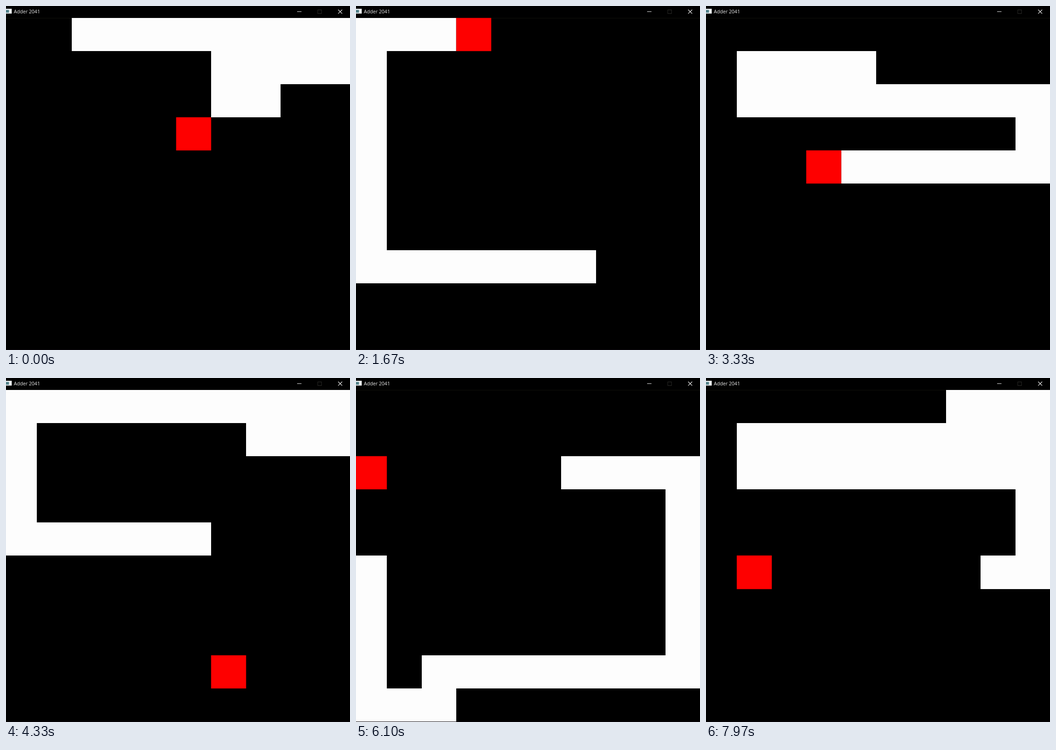
An HTML page that plays this animation: 748x748 px, repeating every 8 s.

```html
<!DOCTYPE html>
<html lang="en">
<head>
<meta charset="utf-8">
<title>Adder 2041</title>
<style>
  html, body { margin: 0; width: 100%; height: 100%; overflow: hidden; background: #000; }
  svg { display: block; width: 100vw; height: 100vh; }
  text { font: 10.6px "Open Sans", "Noto Sans", sans-serif; fill: #ececec; }
</style>
</head>
<body>
<svg viewBox="0 0 748 748">
  <rect width="748" height="748" fill="#000"/>
  <rect y="26" width="748" height="1" fill="#10100a"/>
  <rect y="747" width="748" height="1" fill="#0e0a10"/>

  <rect y="6" width="12.5" height="10.5" fill="#eef2f4"/>
  <rect y="8.5" width="6.5" height="6" fill="#4f8088"/>
  <text x="17" y="16">Adder 2041</text>
  <g fill="none" stroke="#f4f4f4">
    <path d="M633 12.2H642.5"/>
    <rect x="678" y="8.5" width="8" height="8" stroke="#2c2c28"/>
    <path d="M722.3 8L731 16.7M731 8L722.3 16.7" stroke-width="1.1"/>
  </g>

  <path id="snake" fill="#fdfdfd"/>
  <path id="food" fill="#fe0000" stroke="#a00000" stroke-width=".6"/>
</svg>
<script>
const LOOP = 8000, FRAME = 100 / 3, STEP = 51.1, PHASE = 35;
const START_HEAD = 13, START_LENGTH = 14;

// Corners of the route, each pair is column and row.
const corners = ("20 90 91 61 62 92 93 53 54 94 97 07 00 90 91 11 12 92 94 04 00 " +
  "90 91 11 12 92 98 28 29 09 00 90 91 11 12 92 95 15")
  .split(" ").map(c => [+c[0], +c[1]]);

// Positions along the route where food lies, in the order it is eaten.
const meals = [20, 37, 47, 50, 53, 71, 79, 82, 122, 126, 136, 176];

const route = [corners[0]];
for (const [cx, cy] of corners.slice(1)) {
  let [x, y] = route[route.length - 1];
  while (x !== cx || y !== cy) {
    x += Math.sign(cx - x);
    y += Math.sign(cy - y);
    route.push([x, y]);
  }
}

const edgeX = col => Math.round(-9 + 75.8 * col);
const edgeY = row => Math.round(25.7 + 72.15 * row);
const cell = ([x, y]) =>
  `M${edgeX(x)} ${edgeY(y)}H${edgeX(x + 1)}V${edgeY(y + 1)}H${edgeX(x)}Z`;

const snake = document.getElementById("snake");
const food = document.getElementById("food");

function draw(time) {
  const tick = Math.floor((time + 3.4) / FRAME) * FRAME;
  const head = START_HEAD + Math.floor((tick + PHASE) / STEP);
  const eaten = meals.filter(m => m <= head).length;
  const tail = head - START_LENGTH - eaten + 1;
  snake.setAttribute("d", route.slice(tail, head + 1).map(cell).join(""));
  food.setAttribute("d", cell(route[meals[eaten]]));
}

const began = performance.now();
function loop() {
  draw((performance.now() - began) % LOOP);
  requestAnimationFrame(loop);
}
loop();
</script>
</body>
</html>
```
